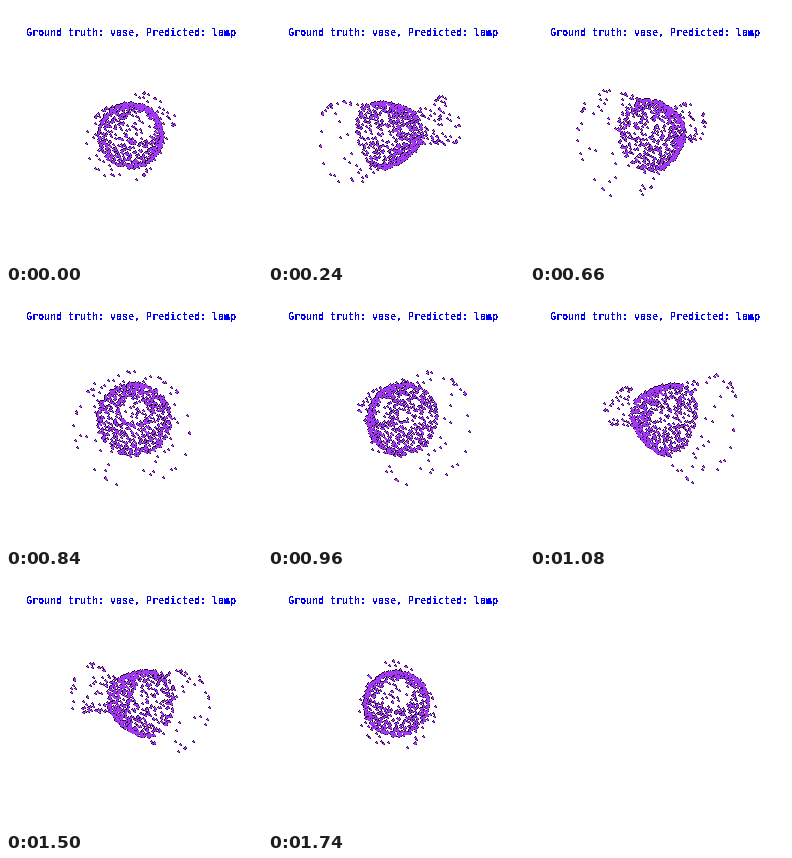
Animation of 256x256 px, one loop 1.8 s. Source, as a matplotlib script:

```python
import numpy as np
import matplotlib.pyplot as plt
from matplotlib.animation import FuncAnimation

SIZE, DPI = 256, 64
FRAMES, INTERVAL = 30, 60
PT = 72 / DPI                  # points per pixel
PURPLE = (164, 56, 246)
DARK = (28, 4, 42)

CX, CY = 128, 126              # pivot on the stage
CAMERA = 290                   # viewing distance
TILT = np.radians(11)          # axis of the vase against the horizontal
START, STEP = 11, 12           # degrees
BACK, FRONT = -23, 23          # ends of the dense body

# Pixels of one dot, as offsets (x, y) from its centre.
RIM_PIXELS = [(0, -1), (-1, 0), (0, 1), (1, 1), (1, 0), (0, 0)]
FILL_PIXELS = [(0, 0), (1, 0), (0, 1)]

rng = np.random.default_rng(11)


def radius(p):
    """Radius of the vase at axial position p, from open foot to neck."""
    body = 34 - 19 * ((p - BACK) / (FRONT - BACK)) ** 2
    foot = 34 + (BACK - p) * 0.31
    neck = 15 + (p - FRONT) * 0.22
    return np.where(p < BACK, foot, np.where(p > FRONT, neck, body))


def ring(p, count, fill=1.0):
    a = rng.uniform(0, 2 * np.pi, count)
    r = radius(p) * fill + rng.normal(0, 0.6, count)
    return np.array([r * np.cos(a), r * np.sin(a), p + np.zeros(count)])


def surface(lo, hi, count):
    """Random points spread evenly over one stretch of the surface."""
    grid = np.linspace(lo, hi, 200)
    r = radius(grid)
    area = np.cumsum(r * np.hypot(1, np.gradient(r, grid)))
    return ring(np.interp(rng.random(count) * area[-1], area, grid), count)


w, v, p = np.hstack([
    surface(BACK, FRONT, 800),
    ring(FRONT, 26, np.sqrt(rng.random(26))),
    surface(-61, BACK, 46),
    ring(-62, 26),
    surface(FRONT, 58, 76),
    ring(58, 8),
])
height = v * np.cos(TILT) + p * np.sin(TILT)
depth = p * np.cos(TILT) - v * np.sin(TILT)


def project(angle):
    c, s = np.cos(angle), np.sin(angle)
    x = w * c + depth * s
    z = depth * c - w * s
    scale = CAMERA / (CAMERA - z)
    return (np.floor(CX + x * scale).astype(int),
            np.floor(CY - height * scale).astype(int))


def stamp(img, x, y, pixels, color):
    for dx, dy in pixels:
        img[y + dy, x + dx] = color


def render(i):
    img = np.full((SIZE, SIZE, 3), 255, np.uint8)
    x, y = project(np.radians(START + STEP * i))
    # Rims lie below all fills, so crowded areas turn plain purple.
    stamp(img, x, y, RIM_PIXELS, DARK)
    stamp(img, x, y, FILL_PIXELS, PURPLE)
    return img


fig = plt.figure(figsize=(SIZE / DPI, SIZE / DPI), dpi=DPI, facecolor="white")
ax = fig.add_axes([0, 0, 1, 1])
cloud = ax.imshow(render(0), extent=(0, SIZE, SIZE, 0),
                  interpolation="nearest", aspect="auto")
ax.axis("off")
ax.text(19.5, 29.5, "Ground truth: vase, Predicted: lamp", color="#0000ff",
        family="DejaVu Sans Mono", weight="bold", size=10 * PT,
        ha="left", va="baseline", antialiased=False)


def draw(i):
    cloud.set_data(render(i))
    return [cloud]


anim = FuncAnimation(fig, draw, frames=FRAMES, interval=INTERVAL,
                     repeat=True, repeat_delay=0, blit=False)
plt.show()
```
